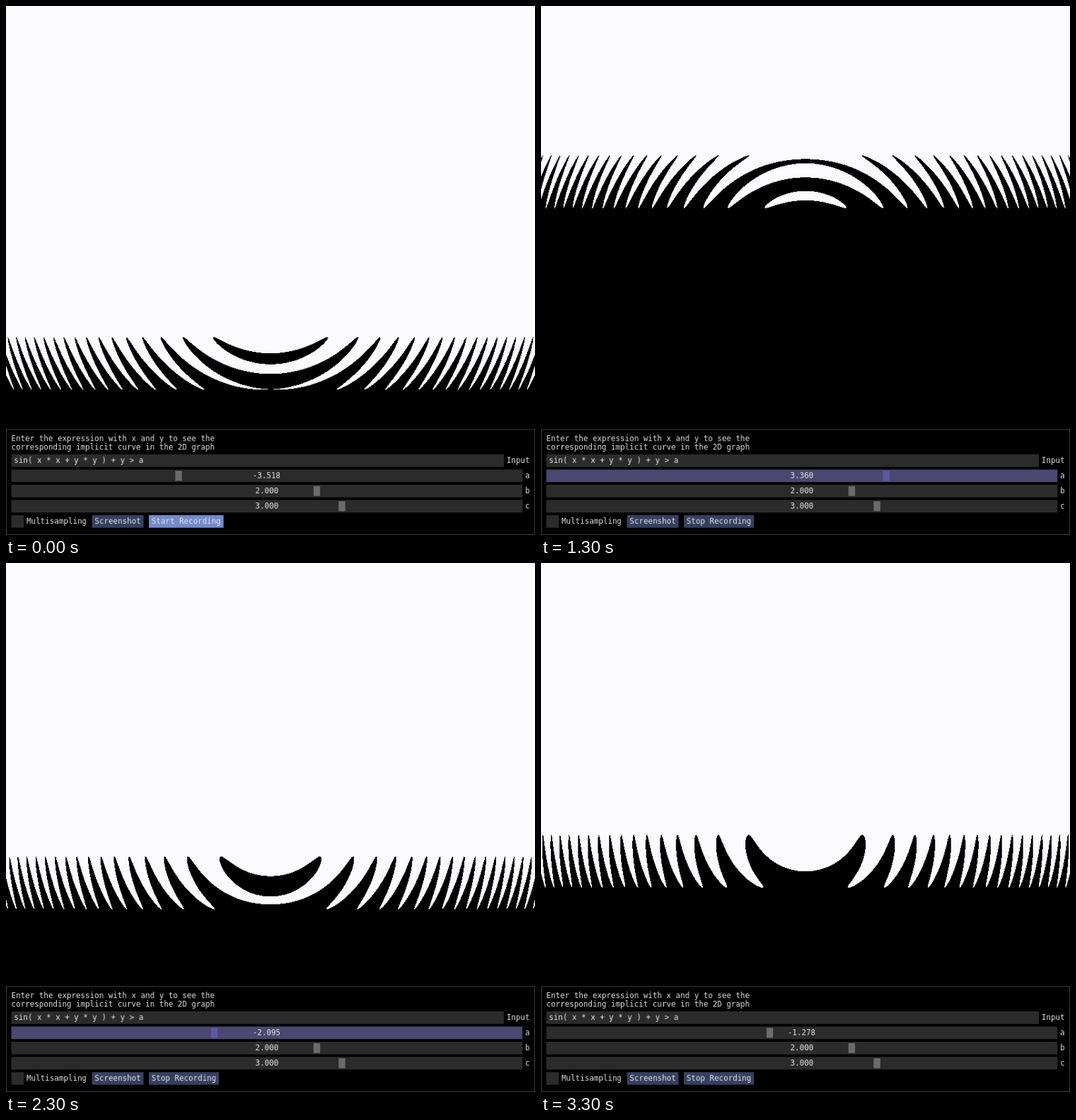
Write an HTML page with a canvas that moves like this. It is 748 px wide and 748 px high and loops after 3.4 s.

```html
<!DOCTYPE html>
<html lang="en">
<head>
<meta charset="utf-8">
<title>Implicit curve plotter</title>
<style>
  html, body { margin: 0; width: 100%; height: 100%; overflow: hidden; background: #000; }
  canvas { display: block; width: 748px; height: 748px; }
</style>
</head>
<body>
<canvas id="stage" width="748" height="748"></canvas>
<script>
const stage = document.getElementById('stage');
const view = stage.getContext('2d');

// The window is drawn at 800 px, then scaled down to the stage
const SIZE = 800, PANEL = 640;
const page = document.createElement('canvas');
page.width = page.height = SIZE;
const ctx = page.getContext('2d');
const STEP = 100, LOOP = 3400, DRAG = 7;

const FRAME = { idle: '#2b2b2b', hover: '#303046', active: '#4a4871' };
const BUTTON = { idle: '#373f60', hover: '#51618f', active: '#758acc' };
const GRAB = '#6b6b6b', GRAB_ACTIVE = '#5c58a8', TEXT = '#e6e6e6';

// Value of a at each step of the drag
const PATH = [
  -3.123, -2.148, -0.856, 0.461, 1.726, 2.69, 3.36, 3.36,
  2.675, 1.542, 0.303, -0.909, -1.937, -2.727, -3.096, -2.832,
  -2.095, -0.751, 0.856, 2.174, 2.174, 1.594, 0.435, -0.672, -1.278
];

const graph = ctx.createImageData(SIZE, PANEL);
const pixels = new Uint32Array(graph.data.buffer);
const coord = i => 20 * i / (SIZE - 1) - 10;

function drawGraph(a) {
  let i = 0;
  for (let row = 0; row < PANEL; row++) {
    const y = -coord(row);
    for (let col = 0; col < SIZE; col++) {
      const x = coord(col);
      pixels[i++] = Math.sin(x * x + y * y) + y > a ? 0xfffffbfb : 0xff000000;
    }
  }
  ctx.putImageData(graph, 0, 0);
}

function rect(x, y, w, h, color) {
  ctx.fillStyle = color;
  ctx.fillRect(x, y, w, h);
}

function text(str, x, y) {
  ctx.fillStyle = TEXT;
  ctx.fillText(str, x, y + 10);
}

function slider(name, value, y, state) {
  rect(8, y, 773, 19, FRAME[state]);
  const x = Math.round(10 + 759 * (value + 10) / 20);
  rect(x, y + 2, 10, 15, state === 'active' ? GRAB_ACTIVE : GRAB);
  const label = value.toFixed(3);
  text(label, Math.floor(394.5 - label.length * 3.5), y + 3);
  text(name, 785, y + 3);
}

function button(label, x, state) {
  rect(x, 770, label.length * 7 + 8, 19, BUTTON[state]);
  text(label, x + 4, 773);
}

function drawPanel(a, step) {
  rect(0, PANEL, SIZE, SIZE - PANEL, '#000');
  ctx.strokeStyle = '#404040';
  ctx.strokeRect(0.5, PANEL + 0.5, SIZE - 1, SIZE - PANEL - 1);

  text('Enter the expression with x and y to see the', 8, 648);
  text('corresponding implicit curve in the 2D graph', 8, 661);
  rect(8, 678, 745, 19, FRAME.idle);
  text('sin( x * x + y * y ) + y > a', 12, 681);
  text('Input', 757, 681);

  const dragging = step >= DRAG && step < DRAG + PATH.length;
  const hovering = step >= 4 && step < DRAG;
  slider('a', a, 701, dragging ? 'active' : hovering ? 'hover' : 'idle');
  slider('b', 2, 724, 'idle');
  slider('c', 3, 747, step === 32 ? 'hover' : 'idle');

  rect(8, 770, 19, 19, FRAME.idle);
  text('Multisampling', 31, 773);
  button('Screenshot', 130, 'idle');
  if (step === 0) button('Start Recording', 216, 'active');
  else button('Stop Recording', 216, step === 1 ? 'hover' : 'idle');
}

let shown = -1;
function tick() {
  const step = Math.floor(performance.now() % LOOP / STEP);
  if (step !== shown) {
    shown = step;
    const a = step < DRAG ? -3.518 : PATH[Math.min(step - DRAG, PATH.length - 1)];
    drawGraph(a);
    drawPanel(a, step);
    view.drawImage(page, 0, 0, stage.width, stage.height);
  }
  requestAnimationFrame(tick);
}

ctx.font = 7 / 0.602 + 'px "DejaVu Sans Mono", monospace';
tick();
</script>
</body>
</html>
```
